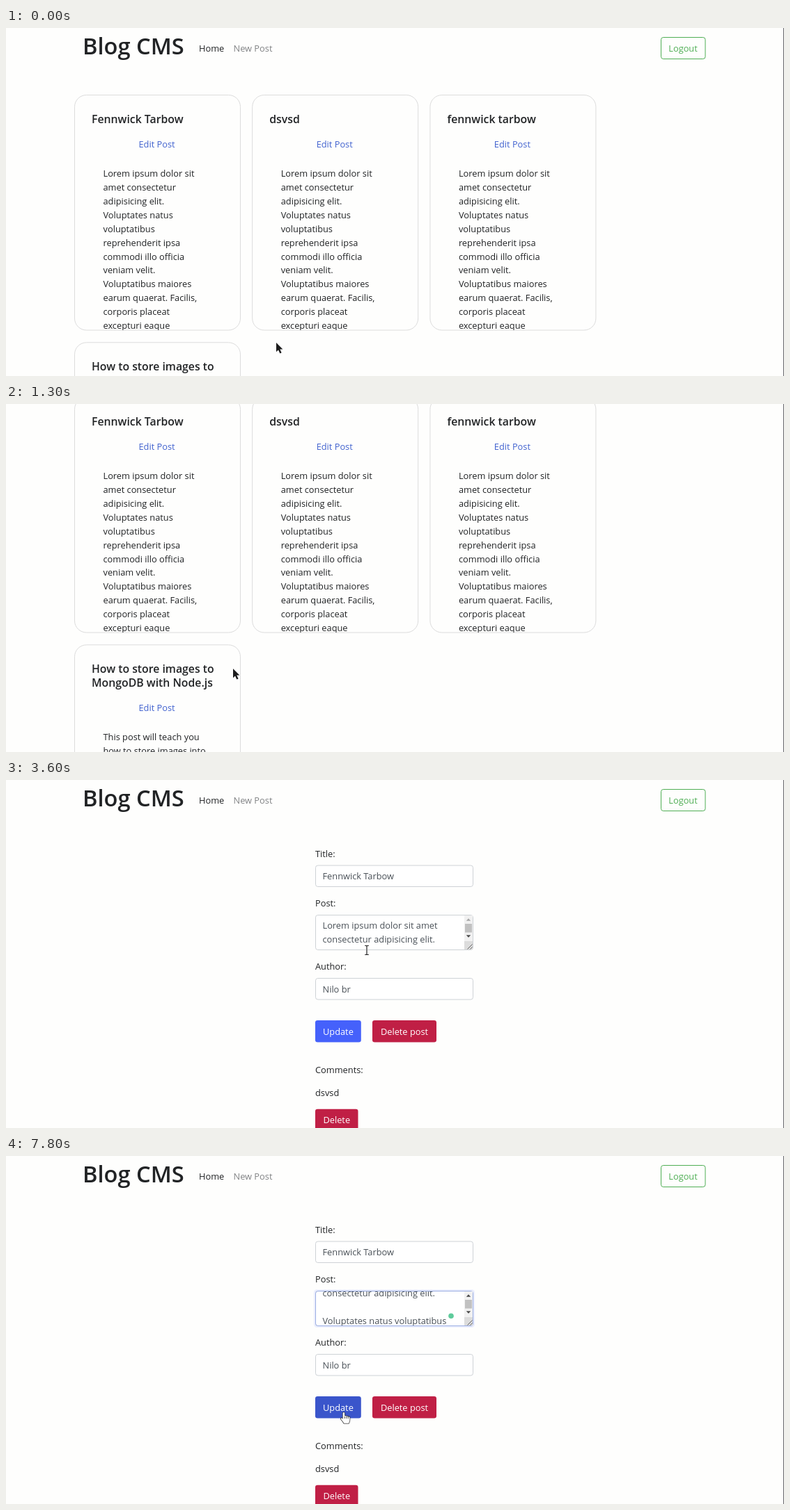
An HTML page with a canvas for the animation above (8000 ms loop, 1117 by 501 pixels).

```html
<!DOCTYPE html>
<html lang="en">
<head>
<meta charset="utf-8">
<title>Blog CMS</title>
<style>
  html, body { margin: 0; width: 100%; height: 100%; overflow: hidden; background: #fefefd; }
  canvas { display: block; }
</style>
</head>
<body>
<canvas id="stage" width="1117" height="501"></canvas>
<script>
const ctx = document.getElementById('stage').getContext('2d');
const W = 1117, H = 501, LOOP = 8000, STEP = 100, LINE = 19.87;
const FONT = '"Open Sans", "Noto Sans", sans-serif';
const BODY = '12.8px ' + FONT;
const HEAD = '600 15.8px ' + FONT;
const BRAND = '600 32.6px ' + FONT;
const INK = '#212325', FIELD = '#495057', BG = '#fefefd';
const BLUE = '#4561fb', BLUE_HOVER = '#3a55cb', RED = '#c01f45', GREEN = '#4fae54', LINK = '#4263cf';

const NAME = 'Fennwick Tarbow';
const LOREM = ['Lorem ipsum dolor sit', 'amet consectetur', 'adipisicing elit.', 'Voluptates natus',
  'voluptatibus', 'reprehenderit ipsa', 'commodi illo officia', 'veniam velit.',
  'Voluptatibus maiores', 'earum quaerat. Facilis,', 'corporis placeat', 'excepturi eaque'];
const GUIDE = ['This post will teach you', 'how to store images into', 'MongoDB with the help of',
  'Node.js and a few small', 'packages. First, create'];
const CARDS = [
  { x: 98, y: 96, title: [NAME], text: LOREM },
  { x: 353.2, y: 96, title: ['dsvsd'], text: LOREM },
  { x: 608.4, y: 96, title: [NAME.toLowerCase()], text: LOREM },
  { x: 98, y: 452.3, title: ['How to store images to', 'MongoDB with Node.js'], text: GUIDE }
];

// Keys are [time, value...]
const SCROLL = [[400, 0], [500, 32], [600, 75.4], [700, 120], [800, 150], [900, 165], [1100, 165],
  [1200, 148], [1300, 106], [1400, 62], [1500, 28], [1600, 8], [1700, 0]];
const POINTER = [[0, 388, 453], [400, 331, 386], [600, 328, 383], [1300, 326, 381], [1700, 300, 349],
  [1800, 300, 349], [1900, 268, 303], [2000, 217, 226], [2100, 188, 192], [2200, 184, 174],
  [2300, 191, 164], [2500, 191, 164], [2800, 232, 313], [3400, 232, 313], [3500, 385, 276],
  [3600, 518, 245], [3700, 596, 234], [3900, 653, 229], [4000, 653, 229], [4300, 618, 231],
  [4400, 618, 231], [4800, 625.5, 226], [6900, 625.5, 226], [7000, 622, 230], [7100, 562, 296],
  [7200, 494, 359], [7300, 494, 359], [7400, 485, 369]];

function sample(keys, t) {
  let i = keys.findIndex(k => k[0] > t);
  if (i === 0) return keys[0].slice(1);
  if (i < 0) return keys[keys.length - 1].slice(1);
  const a = keys[i - 1], b = keys[i], p = (t - a[0]) / (b[0] - a[0]);
  return a.slice(1).map((v, j) => v + (b[j + 1] - v) * p);
}

const within = (t, a, b) => t >= a && t < b;

function text(str, x, y, color = INK, font = BODY, align = 'left') {
  ctx.font = font;
  ctx.fillStyle = color;
  ctx.textAlign = align;
  ctx.fillText(str, x, y);
}

function box(x, y, w, h, r, fill, stroke) {
  ctx.beginPath();
  ctx.roundRect(x, y, w, h, r);
  if (fill) { ctx.fillStyle = fill; ctx.fill(); }
  if (stroke) { ctx.strokeStyle = stroke; ctx.lineWidth = 1; ctx.stroke(); }
}

function button(label, x, y, w, fill) {
  box(x, y, w, 31.5, 3.3, fill);
  text(label, x + w / 2, y + 20.7, '#fff', BODY, 'center');
}

function nav() {
  text('Blog CMS', 110, 37.5, INK, BRAND);
  text('Home', 277, 34, INK);
  text('New Post', 326.5, 34, '#808284');
  box(940.5, 13.5, 63.5, 31, 3.3, null, GREEN);
  text('Logout', 972, 34, GREEN, BODY, 'center');
}

function card({ x, y, title, text: lines }, hover) {
  ctx.save();
  box(x + .5, y + .5, 238, 338.5, 17, null, '#dcdcdc');
  ctx.clip();
  title.forEach((s, i) => text(s, x + 25, y + 41 + i * LINE, INK, HEAD));
  const top = y + (title.length - 1) * LINE;
  text('Edit Post', x + 118.5, top + 76, LINK, BODY, 'center');
  if (hover) {
    ctx.fillStyle = LINK;
    ctx.fillRect(x + 92, top + 77, 53.5, 1);
  }
  lines.forEach((s, i) => text(s, x + 41.5, top + 118.3 + i * LINE));
  ctx.restore();
}

function listPage(t) {
  ctx.save();
  ctx.translate(0, -sample(SCROLL, t)[0]);
  nav();
  CARDS.forEach((c, i) => card(c, i === 0 && t >= 2100));
  ctx.restore();
}

function input(value, y) {
  box(444.5, y + .5, 226, 30.5, 3.3, '#fff', '#ced2d6');
  text(value, 454.5, y + 20.5, FIELD);
}

function triangle(x, y, dir, color) {
  ctx.fillStyle = color;
  ctx.beginPath();
  ctx.moveTo(x - 3.2, y + 1.7 * dir);
  ctx.lineTo(x + 3.2, y + 1.7 * dir);
  ctx.lineTo(x, y - 1.7 * dir);
  ctx.fill();
}

function scrollbar(scrolled) {
  ctx.fillStyle = '#f1f1f1';
  ctx.fillRect(658, 195, 12, 37);
  ctx.fillStyle = '#c1c1c1';
  ctx.fillRect(659, 207, 10, 12.5);
  triangle(664, 201, 1, scrolled ? '#484848' : '#a5a5a5');
  triangle(664, 225, -1, '#484848');
  ctx.fillStyle = '#dcdcdc';
  ctx.fillRect(658, 232, 12, 12);
  ctx.strokeStyle = '#606060';
  ctx.lineWidth = 1;
  ctx.beginPath();
  ctx.moveTo(662.5, 243.5); ctx.lineTo(669.5, 236.5);
  ctx.moveTo(666.5, 243.5); ctx.lineTo(669.5, 240.5);
  ctx.stroke();
}

function focusLevel(t) {
  if (t < 4500) return 0;
  if (t < 4600) return .5;
  if (t < 7600) return 1;
  return t < 7700 ? .6 : .35;
}

function textarea(t) {
  const focus = focusLevel(t);
  const enters = (t >= 5900) + (t >= 6000);
  const offset = [0, 12.2, 32][enters];
  const lines = ['Lorem ipsum dolor sit amet', 'consectetur adipisicing elit.',
    'Voluptates natus voluptatibus', 'reprehenderit ipsa commodi'];
  if (enters === 2) lines.splice(2, 0, '');

  if (focus) box(441.9, 191.9, 231.2, 55.2, 5, `rgba(69,97,251,${.27 * focus})`);
  box(444.5, 194.5, 226, 50, 3.3, '#fff', '#ced2d6');
  if (focus) box(444.5, 194.5, 226, 50, 3.3, null, `rgba(115,145,235,${Math.min(1, focus * 1.6)})`);

  ctx.save();
  ctx.beginPath();
  ctx.rect(445, 195, 213, 49);
  ctx.clip();
  lines.forEach((s, i) => text(s, 454.5, 214.3 + i * LINE - offset, FIELD));
  ctx.fillStyle = FIELD;
  if (within(t, 4500, 5000) || within(t, 5200, 5600)) ctx.fillRect(622, 222, 1, 15);
  if (within(t, 5900, 6700) || within(t, 7000, 7400)) ctx.fillRect(455, 229, 1, 15);
  ctx.restore();

  scrollbar(enters > 0);
  if (t >= 5400) {
    ctx.fillStyle = '#5ecb9b';
    ctx.beginPath();
    ctx.arc(639, 230.3, 3.8, 0, Math.PI * 2);
    ctx.fill();
  }
}

function editPage(t) {
  nav();
  text('Title:', 444, 111);
  input(NAME, 122.5);
  text('Post:', 444, 182);
  textarea(t);
  text('Author:', 444, 273);
  input('Nilo br', 285);
  button('Update', 444, 346, 65.8, t >= 7200 ? BLUE_HOVER : BLUE);
  button('Delete post', 526, 346, 92, RED);
  text('Comments:', 444, 422);
  text('dsvsd', 444, 455.3);
  button('Delete', 444, 473.7, 61.5, RED);
}

function loadingPage() {
  ctx.save();
  ctx.translate(6.5, 0);
  nav();
  ctx.restore();
}

// Pointer shapes, hot spot at 0,0
const ARROW = new Path2D('M0 0V13.2L3 10.4L5.3 15.6L7.6 14.6L5.3 9.6H9.4Z');
const HAND = new Path2D('M-1.4 .8Q0 -.6 1.2 .8V5.4Q2.6 4.5 3.8 5.8Q5.2 5 6.2 6.4Q7.8 5.9 8.6 7.4V11' +
  'Q8.6 13 7.2 15.8H.2Q-1.6 12.8 -4.2 9.8Q-4.6 8 -3 8.2L-1.4 9.6Z');
const BEAM = new Path2D('M-2.8 -6.5H-1Q0 -6.5 0 -5.5Q0 -6.5 1 -6.5H2.8M0 -5.5V5.5' +
  'M-2.8 6.5H-1Q0 6.5 0 5.5Q0 6.5 1 6.5H2.8');

function paint(path, fill, stroke, width) {
  ctx.lineWidth = width;
  ctx.strokeStyle = stroke;
  ctx.lineJoin = 'round';
  ctx.stroke(path);
  if (fill) { ctx.fillStyle = fill; ctx.fill(path); }
}

function pointer(t) {
  if (within(t, 5600, 7000)) return;
  const [x, y] = sample(POINTER, t);
  ctx.save();
  ctx.translate(x, y);
  if (within(t, 2100, 2500) || t >= 7200) {
    paint(HAND, '#fff', '#222', 1.3);
    ctx.beginPath();
    for (const px of [1.2, 3.8, 6.2]) { ctx.moveTo(px, 6); ctx.lineTo(px, 9); }
    ctx.lineWidth = .8;
    ctx.stroke();
  } else if (within(t, 3600, 5600) || within(t, 7000, 7100)) {
    paint(BEAM, null, '#fff', 2.6);
    paint(BEAM, null, '#222', 1.2);
  } else {
    paint(ARROW, '#1c1c1c', '#fff', 1.6);
  }
  ctx.restore();
}

function draw(t) {
  ctx.fillStyle = BG;
  ctx.fillRect(0, 0, W, H);
  if (t < 2500) listPage(t);
  else if (t < 3200) loadingPage();
  else editPage(t);
  ctx.fillStyle = '#66666a';
  ctx.fillRect(W - 1, 0, 1, H);
  pointer(t);
}

const start = performance.now();
function tick() {
  const t = (performance.now() - start) % LOOP;
  draw(Math.floor(t / STEP) * STEP);
  requestAnimationFrame(tick);
}
tick();
</script>
</body>
</html>
```
